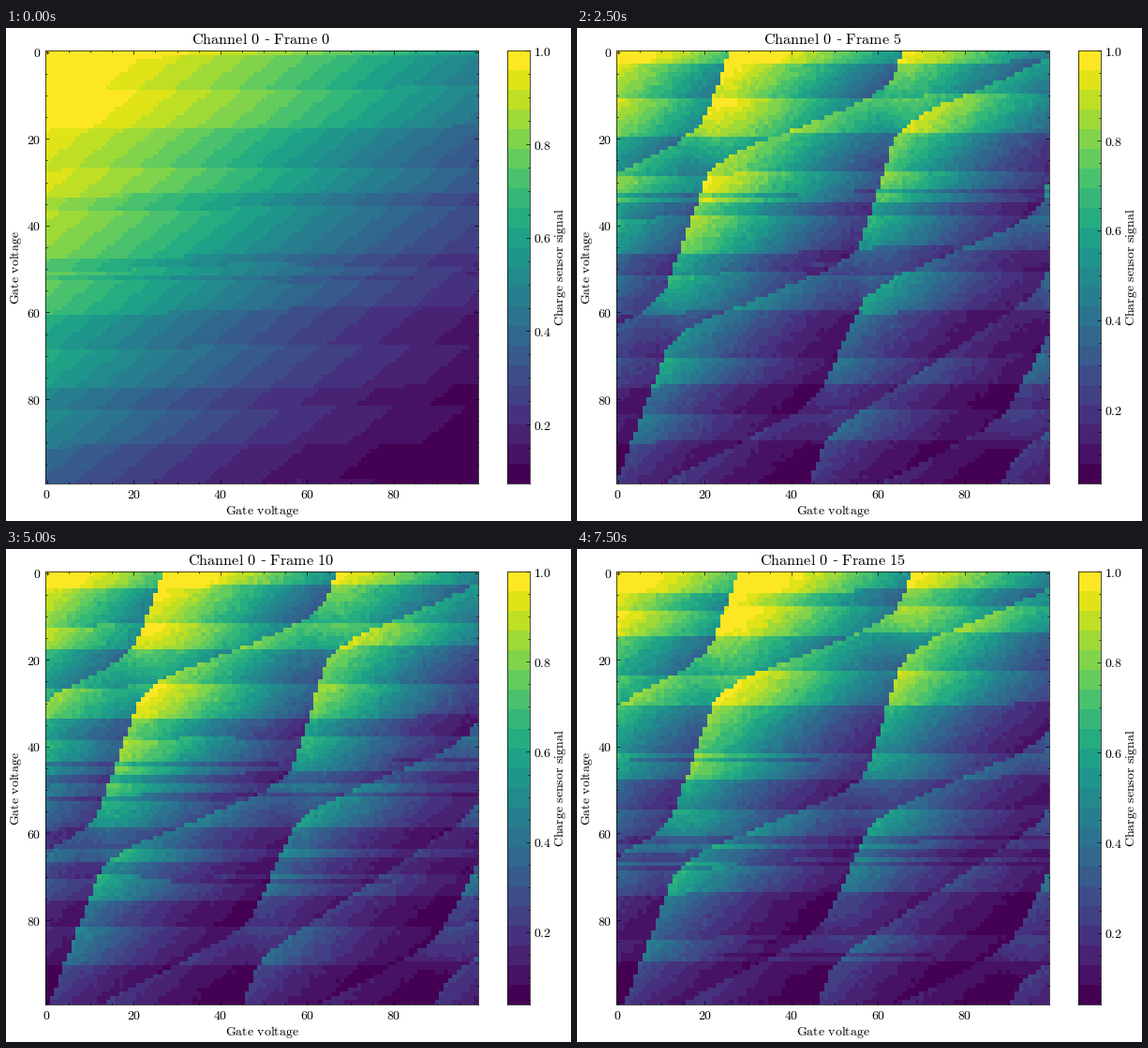
Recreate the animation shown at these times as a matplotlib script. Size 603 by 526 pixels, loop 8000 ms.

```python
import numpy as np
import matplotlib.pyplot as plt
from matplotlib.animation import FuncAnimation
from matplotlib.ticker import FuncFormatter, MultipleLocator

W, H, DPI = 603, 526, 100
FRAMES, INTERVAL = 16, 500
N, LEVELS = 100, 22

plt.rcParams.update({
    "font.family": "DejaVu Serif",
    "mathtext.fontset": "cm",
    "axes.linewidth": 0.5,
})

rows, cols = np.mgrid[0:N, 0:N].astype(float)
scan = rows + cols / N  # raster position, in rows

# Honeycomb nodes: total charge, column, row
NODES = [(1, 20.6, 21.5), (2, 63.8, 12.7), (2, 11.5, 61.2),
         (3, 104, 4), (3, 56.4, 51.1), (4, 47.3, 84.3),
         (4, 99, 41), (5, 100, 58), (6, 90.6, 88.2)]
HALF_GAP = np.array([1.4, 3.5])  # node centre to triple point
STEEP = np.array([0.38, -1])
SHALLOW = np.array([1.9, -1])


def logistic(x):
    return 1 / (1 + np.exp(-x))


def transition(k):
    """Corner points of the line where the total charge goes from k to k + 1."""
    corners = [(np.array([c, r]) + s * HALF_GAP, s)
               for s in (-1, 1) for q, c, r in NODES if q == k + (s < 0)]
    corners.sort(key=lambda p: p[0][1])
    points = [p for p, _ in corners]
    # An upper corner turns steep to shallow, a lower one the reverse
    entry = STEEP if corners[0][1] < 0 else SHALLOW
    leave = SHALLOW if corners[-1][1] < 0 else STEEP
    return np.array([points[0] + 80 * entry, *points, points[-1] - 80 * leave])


LINES = [transition(k) for k in range(7)]


def charges(c, r):
    total = np.zeros((N, N), int)
    for x, y in (line.T for line in LINES):
        rounded = np.mean([np.interp(r + s, y, x) for s in range(-4, 5)], axis=0)
        total += c > rounded
    first = np.maximum(0, (total - 1) // 2).astype(float)
    for k, c0, r0 in NODES:
        step = logistic(((c - c0) - 0.4 * (r - r0)) / 3)
        first += np.where(total == k, step, 0)
    return first, total - first


def bright(rng):
    """Two-level sensor noise: recurring bright bands and a few short streaks."""
    falls = 3 + 14.5 * np.arange(7) + rng.normal(0, 1.5, 7)
    rises = falls - rng.uniform(5, 11, 7)
    starts = rng.uniform(0, N, 6)
    ends = starts + rng.exponential(0.5, 6)
    flips = np.sort(np.concatenate([falls, rises, starts, ends]))
    return np.searchsorted(flips, scan) % 2


def drift(n):
    return 0.15 * (n - 2) + 0.5 * np.cos(2 * np.pi * (n - 8) / 5)


def signal(n):
    rng = np.random.default_rng(100 + n)
    high = bright(rng)
    if n == 0:
        x = (cols + 1.25 * rows - 80) / 48 - 0.19 * high
    else:
        c = cols - drift(n) + 0.4
        r = rows - 0.9 * drift(n)
        n1, n2 = charges(c, r)
        x = -1.3 + 0.06 * c + 0.064 * r - 1.8 * n1 - 0.83 * n2
        x += rng.normal(0, 0.045, (N, N)) - 0.45 * high
    return np.clip(1.25 * logistic(-x), 0, 1)


def lowest(n):
    return 0.032 + 0.0006 * n if n else 0.073


def tex(s):
    return " ".join(w if w == "-" else rf"$\mathrm{{{w}}}$" for w in s.split())


def box(x, y, w, h):
    return fig.add_axes([x / W, 1 - (y + h) / H, w / W, h / H])


def label(x, y, s, size=10, rotation=0):
    return fig.text(x / W, 1 - y / H, tex(s), size=size, rotation=rotation,
                    ha="center", va="baseline", rotation_mode="anchor")


def style_axis(axis, major, minor, fmt):
    axis.set_major_locator(MultipleLocator(major))
    axis.set_minor_locator(MultipleLocator(minor))
    axis.set_major_formatter(FuncFormatter(lambda v, _: tex(format(v, fmt))))
    axis.set_tick_params(which="major", direction="in", length=3, width=0.5, labelsize=10)
    axis.set_tick_params(which="minor", direction="in", length=1.5, width=0.5)


fig = plt.figure(figsize=(W / DPI, H / DPI), dpi=DPI, facecolor="white")
cmap = plt.get_cmap("viridis", LEVELS)

ax = box(42.4, 24.4, 462, 462)
image = ax.imshow(signal(0), cmap=cmap, vmin=0, vmax=1, aspect="auto",
                  interpolation="nearest", extent=(-0.25, 99.5, 99.5, -0.25))
style_axis(ax.xaxis, 20, 5, ".0f")
style_axis(ax.yaxis, 20, 5, ".0f")
ax.tick_params(which="both", top=True, right=True)

cax = box(535.4, 24.4, 23.1, 462)
bar = cax.imshow(np.linspace(0, 1, LEVELS)[:, None], cmap=cmap, vmin=0, vmax=1,
                 aspect="auto", origin="lower", interpolation="nearest")
cax.set_xticks([])
cax.yaxis.tick_right()
style_axis(cax.yaxis, 0.2, 0.05, ".1f")

title = label(272.5, 17, "Channel 0 - Frame 0", 11.7)
label(273, 518.7, "Gate voltage")
label(14, 255.5, "Gate voltage", rotation=90)
label(595, 255.5, "Charge sensor signal", rotation=90)


def update(n):
    floor = lowest(n)
    image.set_data(signal(n))
    image.set_clim(floor, 1)
    bar.set_extent((0, 1, floor, 1))
    cax.set_ylim(floor, 1)
    title.set_text(tex(f"Channel 0 - Frame {n}"))
    return image, bar, title


anim = FuncAnimation(fig, update, frames=FRAMES, interval=INTERVAL,
                     repeat=True, repeat_delay=0, blit=False)
plt.show()
```
